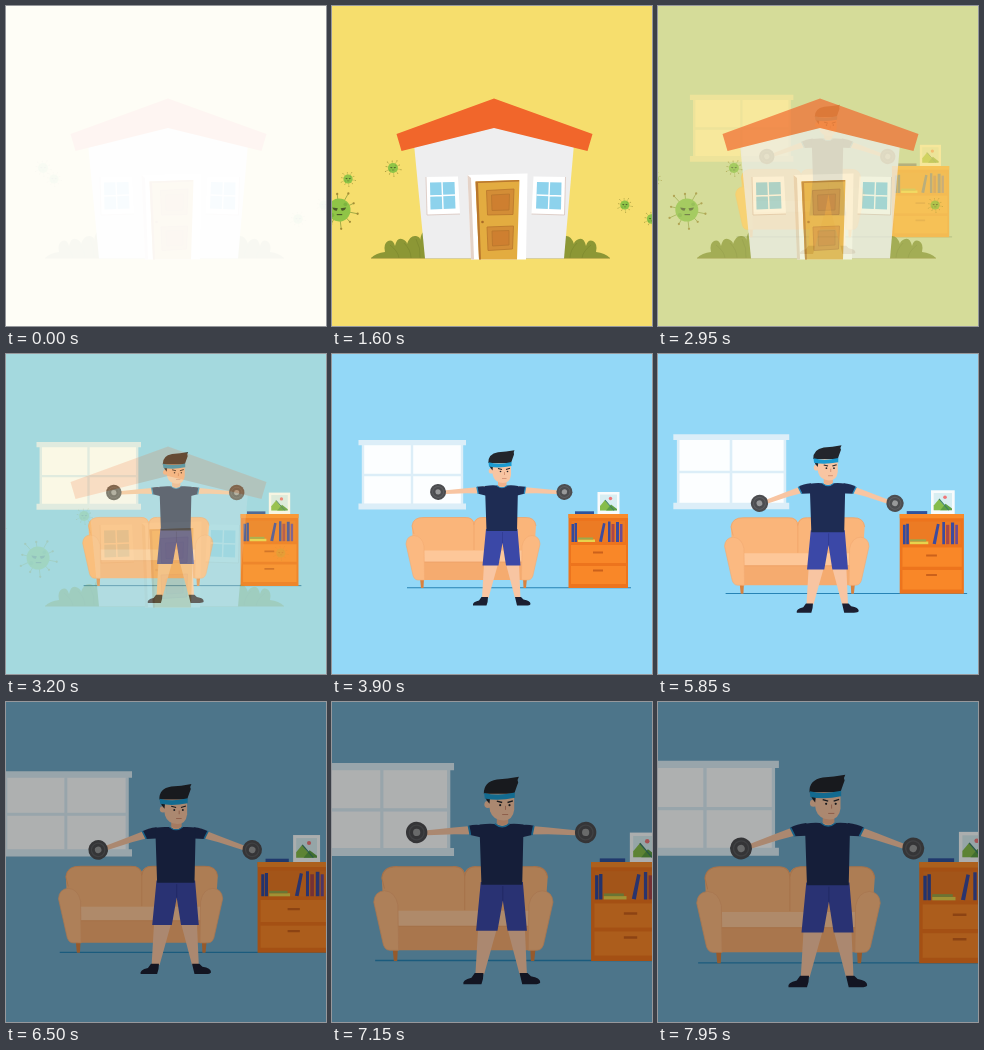
Write an HTML page that moves like this. It is 320 px wide and 320 px high and loops after 8 s.

```html
<!DOCTYPE html>
<html lang="en">
<head>
<meta charset="utf-8">
<title>Stay home workout</title>
<style>
html, body { margin: 0; height: 100%; overflow: hidden; background: #fff; }
svg { display: block; width: 100vw; height: 100vh; }
</style>
</head>
<body>
<svg viewBox="0 0 320 320">
  <defs>
    <g id="bush" fill="#8c9735">
      <path d="M39 252Q44 247 53 246Q51 238 56 235Q61 233 63 240Q65 231 70 233Q75 235 75 238Q78 229 84 230Q89 231 88 235Q89 226 93 225V252Z"/>
      <path d="M58 239Q66 245 67 252M72 237Q79 244 79 252M84 233Q89 242 88 252" fill="none" stroke="#7d882e" stroke-width=".7"/>
    </g>
    <g id="pane">
      <path d="M94 171L126 170.5L128 208L95 209Z" fill="#fff"/>
      <path d="M94 171L95 209L128 208" fill="none" stroke="#d9c5bd" stroke-width=".8"/>
      <path d="M98 176.5L122.500 176L123.500 202.500L98.500 203.500Z" fill="#8dd2ec"/>
      <path d="M110 176L111 203M98 190L123 189" stroke="#fff" stroke-width="1.4"/>
    </g>
    <g id="arm">
      <path d="M153 132.500L134 133.300L114 134.300Q109 133.500 107 135V138H114L134 138.300L153 139.500Z" fill="#f8c5a2"/>
      <path d="M157 133Q150 131.500 145 132.500L146 139.500L158 143Z" fill="#1e2c53"/>
      <path d="M145 132.500L146 139.500" stroke="#278fc5" stroke-width="1.300"/>
      <circle cx="106" cy="135.500" r="8" fill="#4c4d50"/>
      <circle cx="106" cy="135.500" r="5.500" fill="none" stroke="#5d5e61" stroke-width="1"/>
      <circle cx="106" cy="135.500" r="2.700" fill="#98999a"/>
    </g>
  </defs>

  <rect width="320" height="320" fill="#f6de6d"/>

  <g id="room">
    <rect id="wall" width="320" height="320" fill="#93d8f7"/>
    <rect id="wallShade" width="320" height="320" fill="#70a9c8"/>
    <g id="camera">
      <path d="M30 90H131V151H30Z" fill="#fcfeff"/>
      <path d="M31 91V150M130 91V150M80 91V150M31 121H130" stroke="#dceef8" stroke-width="2.400"/>
      <path d="M26.500 86H134V91.300H26.500ZM26.500 149.500H134V155.500H26.500Z" fill="#dceef8"/>

      <path d="M75 233.700H299" stroke="#2783b5" stroke-width="1"/>

      <path d="M88 224H92L91.500 234H89ZM191 224H195L194 234H191.500Z" fill="#d9823f"/>
      <path d="M82 214L80 172Q81 163 92 163.500H133Q140 163 142 168Q144 163 151 163.500H193Q203 163 204 172L201 214Z" fill="#fab57a"/>
      <path d="M82 180L80 172Q81 163 92 163.500H133Q142 163 142 172V196M142 171Q143 163 151 163.500H193Q203 163 204 172" fill="none" stroke="#f0a56b" stroke-width=".8"/>
      <path d="M90 208H194V226H90Z" fill="#f5ab6f"/>
      <path d="M91 196.500H193V208H91Z" fill="#fdc799"/>
      <path d="M91 208H193" stroke="#eda065" stroke-width=".8"/>
      <path id="rest" d="M74 190Q74.500 182 82 181.500Q90 182 92 192L92.500 226H86Q81.500 226 80.500 219Z" fill="#fbb981" stroke="#f3ab73" stroke-width=".6"/>
      <use href="#rest" transform="translate(282 0) scale(-1 1)"/>

      <g id="shelf">
        <path d="M236.500 160H296V234H236.500Z" fill="#ed741d"/>
        <path d="M236.500 160H296V164H236.500Z" fill="#f98b2a"/>
        <path d="M239.500 167H293V188H239.500Z" fill="#ec7b24"/>
        <path d="M239 191H294V209H239ZM239 212H294V230H239Z" fill="#f98728"/>
        <path d="M261 198.500H271M261 216.500H271" stroke="#cb611b" stroke-width="1.800"/>
        <path d="M239.500 170H242V188H239.500ZM242.500 169H245V188H242.500Z" fill="#344a9c"/>
        <path d="M246 185.500H263V188H246Z" fill="#e7d34c"/>
        <path d="M246 183.500H261V185.500H246Z" fill="#9aa94b"/>
        <path d="M267 187.500L271 169L273.500 169.500L270 188ZM276 167.500H278.500V188H276ZM284 168H287V188H284Z" fill="#3d4b9e"/>
        <path d="M279.500 170H282.500V188H279.500Z" fill="#a8474c"/>
        <path d="M288 170H290.500V188H288Z" fill="#6c4c94"/>
        <path d="M243 157.300H262V160H243Z" fill="#2f539d"/>
        <path d="M265.500 138H287.500V160H265.500Z" fill="#f8fbfc"/>
        <path d="M268 140.500H285V156.500H268Z" fill="#d8eef2"/>
        <path d="M268 156.500V152L273 146L281 156.500Z" fill="#86bd4b"/>
        <path d="M274 156.500L279 150.500L285 155V156.500Z" fill="#5d9f43"/>
        <path d="M273 146L282 156.500" stroke="#3c7f65" stroke-width="1"/>
        <circle cx="278.500" cy="144.500" r="1.700" fill="#ef7779"/>
      </g>

      <g id="man">
        <path d="M152 210H166L156.500 244H150ZM174 210H187L188.500 244H183Z" fill="#f8c5a2"/>
        <path d="M149.500 243H156Q156 248 154.500 251.500H141Q140 248 147 246.500ZM183 243H189L191.500 245.500Q198.500 246.500 198.500 250Q198 251.500 194 251.500H185Z" fill="#1b1f31"/>
        <path d="M154 175H185.500L188.500 211.500H174L170.500 189L166.500 211.500H150.500Z" fill="#3b48a7"/>
        <path d="M170.500 189V178" stroke="#303b91" stroke-width=".8"/>
        <use id="armLeft" href="#arm"/>
        <g transform="translate(338.500 0) scale(-1 1)"><use id="armRight" href="#arm"/></g>
        <path d="M153 132Q160 131 164 131.500H175Q181 131 186 132L185 177H154.500Z" fill="#1e2c53"/>
        <path d="M164.500 131.300Q170 136 175.500 131.300" fill="#f8c5a2" stroke="#278fc5" stroke-width="1"/>
        <path d="M166 122H174.500V131Q170 134.500 166 131Z" fill="#efb18b"/>
        <path d="M158.500 108H179V121Q178 129 171 129Q163 128.500 161 122Z" fill="#f8c5a2"/>
        <circle cx="159.300" cy="117" r="2.600" fill="#f8c5a2"/>
        <path d="M156.300 109Q156 100 166 98.300Q174 98 182.500 96.300Q181 98.500 182 100.500Q180 106 179 109Z" fill="#23262c"/>
        <path d="M157.500 112H161L160.500 116.500L158.500 114Z" fill="#23262c"/>
        <path d="M156.500 108.300Q167 111 179.500 108V112Q167 114.500 157 112.500Z" fill="#1c9bd0"/>
        <path d="M166 114.500L170 115.500M174 115.500L178 114.300" stroke="#23262c" stroke-width="1"/>
        <circle cx="168.500" cy="117.500" r=".8" fill="#23262c"/>
        <circle cx="175.500" cy="117.500" r=".8" fill="#23262c"/>
        <path d="M172.500 118V121M170 124.500H174.500" fill="none" stroke="#c98468" stroke-width=".7"/>
      </g>
    </g>
    <rect id="shade" width="320" height="320" fill="#000"/>
  </g>

  <g id="house">
    <use href="#bush"/>
    <use href="#bush" transform="translate(317 0) scale(-1 1)"/>
    <path d="M39 252.300H278" stroke="#9a913a" stroke-width=".7"/>
    <path d="M82 138L162 119L242 138L232 252.500H93Z" fill="#eeeeef"/>
    <path d="M162 92.500L260.500 128L255.500 145L162 122L69.500 145L64.500 128Z" fill="#f1662b"/>
    <use href="#pane"/>
    <use href="#pane" transform="translate(327.500 0) scale(-1 1)"/>
    <path d="M135.500 169L195.500 167.500L194 253.500H139Z" fill="#fff"/>
    <path d="M135.500 169L139 253.500H142L139 172Z" fill="#e5d3c8"/>
    <path d="M143.500 175.500L187.500 174L185 253.500H147Z" fill="#e3ac40"/>
    <path d="M143.500 175.500L147 253.500H149L146 177L187 175.500V174Z" fill="#b9772d"/>
    <g fill="#d38d36" stroke="#b9772d" stroke-width=".8">
      <path d="M154.500 184.500L182 183L181 208.500L155.500 209Z"/>
      <path d="M155 221L181.500 220L180.500 243L156 244.500Z"/>
      <path d="M159.500 189L177.500 188L177 204L160 204.500Z" fill="#ce7f30"/>
      <path d="M160 225L177 224.500V239L160.500 240Z" fill="#ce7f30"/>
    </g>
    <circle cx="150.500" cy="216" r="1.300" fill="#a96b27"/>
    <g id="viruses"></g>
  </g>
  <rect id="veil" width="320" height="320" fill="#fff"/>
</svg>
<script>
const LOOP = 8000;
const $ = id => document.getElementById(id);
const clamp = x => Math.max(0, Math.min(1, x));
const ramp = (t, from, to) => clamp((t - from) / (to - from));
const smooth = x => x * x * (3 - 2 * x);
const fade = (id, opacity) => $(id).setAttribute('opacity', opacity);

// start x, y, radius, total drift
const viruses = [
  [48, 173, 4.6, -52],
  [37, 162, 5, 39],
  [-28, 204, 11.5, 57],
  [318, 199, 4.6, -41],
  [292, 213, 4.8, 45]
];

function virusMarkup([, , r]) {
  let spikes = '';
  for (let i = 0; i < 10; i++) {
    const a = i * Math.PI / 5 + .2, len = i % 2 ? 1.4 : 1.65;
    const x = Math.cos(a) * len, y = Math.sin(a) * len;
    spikes += `<path d="M0 0L${x} ${y}" stroke="#8f9e3c" stroke-width=".07"/>
      <circle cx="${x}" cy="${y}" r=".1" fill="#a18c36"/>`;
  }
  return `<g><g transform="scale(${r})">${spikes}
    <circle r="1" fill="#8fc447"/>
    <circle cx=".55" cy="-.5" r=".16" fill="#7db43f"/>
    <circle cx="-.6" cy=".45" r=".18" fill="#7db43f"/>
    <path d="M-.58 -.22L-.1 -.16L-.2 .06Q-.46 .08 -.58 -.22M.62 -.22L.14 -.16L.24 .06Q.5 .08 .62 -.22" fill="#4a5a28"/>
    <path d="M-.2 .4H.28" stroke="#4a5a28" stroke-width=".1"/>
  </g></g>`;
}
$('viruses').innerHTML = viruses.map(virusMarkup).join('');
const virusNodes = [...$('viruses').children];

function draw(ms) {
  const t = ms / 1000;
  const drift = t * (17.1 - 1.33 * t) / 39;
  viruses.forEach(([x, y, , dx], i) =>
    virusNodes[i].setAttribute('transform', `translate(${x + dx * drift} ${y})`));

  const zoom = 1 + .04 * (t - 3.9) + .207 * smooth(ramp(t, 6, 6.9));
  $('camera').setAttribute('transform',
    `translate(169.5 160) scale(${zoom}) translate(-169.5 -160)`);

  const lift = smooth(clamp(.5 + 2 * Math.cos((t - 3.525) / 1.8 * 2 * Math.PI)));
  const pose = `translate(${-2 * (1 - lift)} 0) rotate(${-(18.5 - 15.5 * lift)} 152 135.5)`;
  $('armLeft').setAttribute('transform', pose);
  $('armRight').setAttribute('transform', pose);

  const indoors = ramp(t, 2.79, 3.29);
  const dusk = ramp(t, 6.05, 6.45);
  fade('room', indoors);
  fade('house', 1 - indoors);
  fade('wallShade', dusk);
  fade('shade', .31 * dusk);
  fade('veil', 1 - ramp(t, -.05, .75));
}

const start = performance.now();
function tick(now) {
  draw(Math.max(0, now - start) % LOOP);
  requestAnimationFrame(tick);
}
draw(0);
requestAnimationFrame(tick);
</script>
</body>
</html>
```
